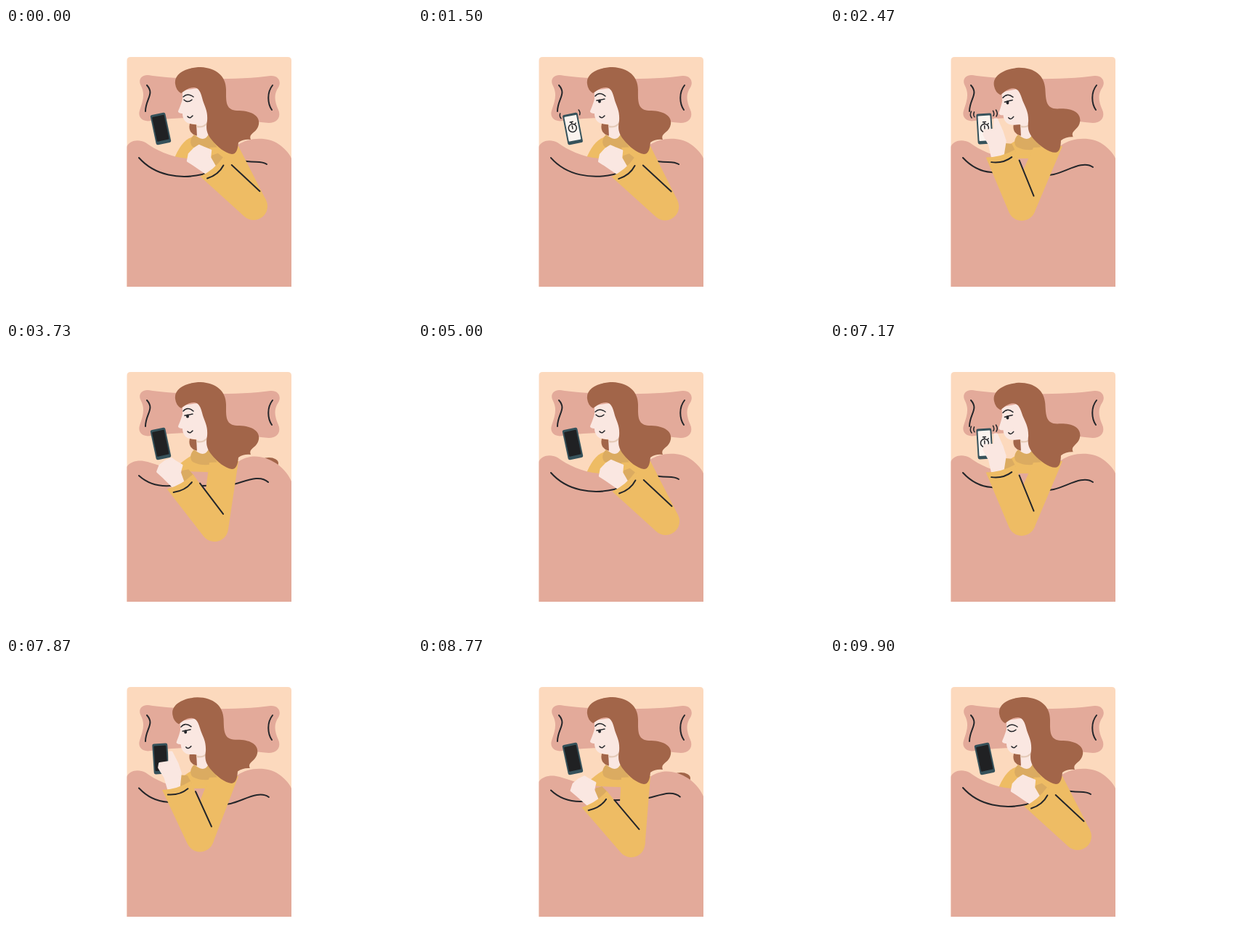
Recreate the animation shown at these times as an HTML page. Size 559x396 px, loop 9930 ms.

```html
<!DOCTYPE html>
<html lang="en">
<head>
<meta charset="utf-8">
<title>Snooze</title>
<style>
  html, body { margin: 0; width: 100%; height: 100%; overflow: hidden; background: #fff; }
  svg { display: block; width: 559px; height: 396px; }
  .line { fill: none; stroke: #24262a; stroke-width: 2; stroke-linecap: round; }
  .thin { stroke-width: 1.5; }
  .rose { fill: #e3aa9a; }
  .hair { fill: #a26549; }
  .skin { fill: #fae7e1; }
  .wool { fill: #eebc64; }
  .fold { fill: #dbab61; }
  #hand { stroke: #fae7e1; stroke-width: 3; stroke-linejoin: round; }
</style>
</head>
<body>
<svg viewBox="0 0 559 396">
  <clipPath id="bed"><path d="M166.500 357V45q0-5 5-5H388q5 0 5 5V357Z"/></clipPath>
  <g clip-path="url(#bed)">
    <rect x="166" y="40" width="228" height="317" fill="#fcd9bd"/>
    <path class="rose" d="M196 65C187 64 181 71 186 80C192 92 188 102 184 114C181 124 189 130 199 128C230 124 260 123 290 125C315 126 340 129 362 131C374 131 379 122 375 113C369 99 369 91 375 82C380 73 374 65 364 66C320 72 240 72 196 65Z"/>
    <path class="line" d="M194 79C205 91 192 98 192 115M367 79C359 89 360 104 366 113"/>
    <ellipse class="hair" cx="362" cy="166" rx="13" ry="8"/>
    <path class="hair" d="M253 132C251 140 254 147 264 149L272 135Z"/>
    <path id="chest" class="wool"/>
    <path class="skin" d="M262 130L263 150L271 157L282 148L279 125Z"/>
    <path d="M262 134Q270 138 277 130V133Q271 139 262 137Z" fill="#e6cbb9"/>
    <path class="fold" d="M259 147C253 153 253 160 257 164C266 169 280 170 291 165L279 146C275 156 267 154 259 147Z"/>
    <path id="quilt" class="rose"/>
    <path id="crease" class="line"/>
    <g id="phone">
      <rect x="-10.500" y="-21" width="21" height="42" rx="2.500" fill="#36525b"/>
      <rect id="screen" x="-8.500" y="-18" width="17" height="34.500" rx="1"/>
      <g id="ring" class="line thin">
        <circle r="5.500" cy="-1"/>
        <path d="M0 -4V0M0 -7V-9M-2 -9.500H2M4.500 -6L5.500 -7"/>
        <path d="M-13 -17q-2-3 0-7M13 -17q2-3 0-7"/>
        <path id="wave" d="M-17 -16q-3-4 0-9M17 -16q3-4 0-9"/>
      </g>
    </g>
    <path id="upper" class="wool"/>
    <g id="fore">
      <path class="fold" d="M0 -82L12 -90L20 -86L21 -74L5 -70Z"/>
      <path id="hand" class="skin"/>
      <path class="wool" d="M-20 -82Q0 -74 21 -77L19 0A19 19 0 0 1 -19 0Z"/>
      <path class="line" d="M-15.500 -73Q-1 -65 13 -69M21 -61V-8"/>
    </g>
    <g id="head">
      <path class="skin" d="M243 86V98C241 106 238 112 237 115C237 117 240 118 243 118C243 123 245 128 250 131C258 134 270 132 280 128L272 82Z"/>
      <path class="hair" d="M233 77C231 63 248 54 268 54C290 55 303 67 303 85C303 101 302 113 318 114C338 114 350 121 348 133C346 145 333 145 337 154Q327 153 320 158C319 168 317 174 311 174C302 173 291 164 283 154C276 145 275 139 277 128C278 115 274 109 271 100C268 88 266 83 259 82C251 82 247 86 241 90Q234 86 233 77Z"/>
      <path id="brow" class="line thin"/>
      <path id="lid" class="line thin"/>
      <ellipse id="pupil" cx="250" cy="101" rx="2" ry="2.600" fill="#24262a"/>
      <path class="line thin" d="M250 122Q253 126 257 121"/>
    </g>
  </g>
</svg>
<script>
const LOOP = 9930, CYCLE = LOOP / 2;
const el = {};
document.querySelectorAll('[id]').forEach(n => el[n.id] = n);

const lerp = (a, b, k) => a + (b - a) * k;
const clamp = k => Math.max(0, Math.min(1, k));
const smooth = k => k * k * (3 - 2 * k);
const easeIn = k => k ** 2;
const easeOut = k => 1 - (1 - k) ** 2;

// Blends the numbers of two paths with the same commands.
function mix(a, b, k) {
  const to = b.match(/-?[\d.]+/g);
  let i = 0;
  return a.replace(/-?[\d.]+/g, n => lerp(+n, +to[i++], k).toFixed(2));
}

// Keys are [time, value, easing into it].
function track(keys, t) {
  let prev = keys[0];
  for (const key of keys) {
    if (t < key[0]) {
      const k = clamp((t - prev[0]) / (key[0] - prev[0]));
      return lerp(prev[1], key[1], (key[2] || smooth)(k));
    }
    prev = key;
  }
  return prev[1];
}

const REACH = [[0, 0], [1460, 0], [2150, 1], [2550, 1], [3370, .9], [3770, .655, easeIn], [4960, 0, easeOut]];
const HEAD = [[0, 0], [1460, 0], [2150, 1], [2500, 1], [3320, 0]];
const DIP = [[0, 0], [1500, 0], [1800, 1], [2150, 0], [3380, 0], [3720, 1], [3900, 1], [4900, 0]];
const EYE = [[0, 0], [750, 0], [1050, 1], [4250, 1], [4500, 0]];

const CREASE = [
  'M183 179C205 204 240 209 270 202S320 182 332 184S352 183 359 188',
  'M183 183C195 194 210 198 226 197S300 199 317 194S350 182 361 192',
  'M183 179C195 192 207 198 222 199S290 206 308 202S348 182 362 192'
];
const QUILT = [
  'M166 164C170 155 182 153 192 158C206 168 225 178 250 180L300 180L318 162C335 150 360 150 375 160C385 167 392 175 394 183L394 357L166 357Z',
  'M166 171C172 162 185 161 195 164C210 168 225 176 250 177L300 179L318 165C335 152 355 155 372 166C385 175 392 187 394 194L394 357L166 357Z'
];
const CHEST = [
  'M230 184C238 164 246 153 258 150L300 150L322 165L320 188L230 188Z',
  'M226 180C236 168 248 160 258 154L300 150L322 165L320 188L230 184Z'
];
const HAND = [
  'M-11 -77L3 -74L8 -90L16 -96L12 -106L10 -112L2 -114L-8 -114L-16 -109L-14 -98Z',
  'M-12 -78L1 -73L13 -93L14 -107L13.5 -125L11 -126L5 -113L-8 -117L-11 -112L-9 -96Z'
];
const SHOULDER = [[280, 165], [320, 163]];

function drawArm(q) {
  const sag = 4 * q * (1 - q);
  const x = lerp(341, 264, q), y = lerp(246, 247, q) + 9.9 * sag;
  const angle = lerp(47, 22, q) + 9 * sag;
  const dx = x - 300, dy = y - 164, r = 19 / Math.hypot(dx, dy);
  const [s1, s2] = SHOULDER;
  el.upper.setAttribute('d', `M${s1}L${s2}L${x + dy * r} ${y - dx * r}L${x - dy * r} ${y + dx * r}Z`);
  el.fore.setAttribute('transform', `translate(${x} ${y}) rotate(${-angle})`);
  el.hand.setAttribute('d', mix(...HAND, smooth(clamp((q - .72) / .28))));
}

function drawPhone(t, q) {
  const on = t >= 390 && t < 2480;
  const shake = on ? 1.5 * Math.sin(t / 21) : 0;
  const turn = -12 + 10 * clamp((q - .75) / .25) + shake;
  el.phone.setAttribute('transform', `translate(213 139) rotate(${turn})`);
  el.screen.setAttribute('fill', on ? '#fbf3ee' : '#202123');
  el.ring.style.display = on ? '' : 'none';
  el.wave.style.display = t % 260 < 200 ? '' : 'none';
}

function drawHead(h, open) {
  el.head.setAttribute('transform', `translate(${-1.5 * h} ${-.5 * h}) rotate(${-3.7 * h} 285 165)`);
  el.brow.setAttribute('d', mix('M244 95Q250 89 258 95', 'M244 94Q250 87 258 94', open));
  el.lid.setAttribute('d', mix('M245 99Q250 104 256 99', 'M246 100Q251 99 257 98', open));
  el.pupil.setAttribute('ry', 2.6 * open);
}

function draw(time) {
  const t = time % LOOP % CYCLE;
  const q = track(REACH, t);
  const [rest, mid, touch] = CREASE;
  el.crease.setAttribute('d', q < .7 ? mix(rest, mid, q / .7) : mix(mid, touch, (q - .7) / .3));
  el.quilt.setAttribute('d', mix(...QUILT, track(DIP, t)));
  el.chest.setAttribute('d', mix(...CHEST, clamp(q * 1.4)));
  drawPhone(t, q);
  drawArm(q);
  drawHead(track(HEAD, t), track(EYE, t));
}

const start = performance.now();
function tick() {
  draw(performance.now() - start);
  requestAnimationFrame(tick);
}
tick();
</script>
</body>
</html>
```
